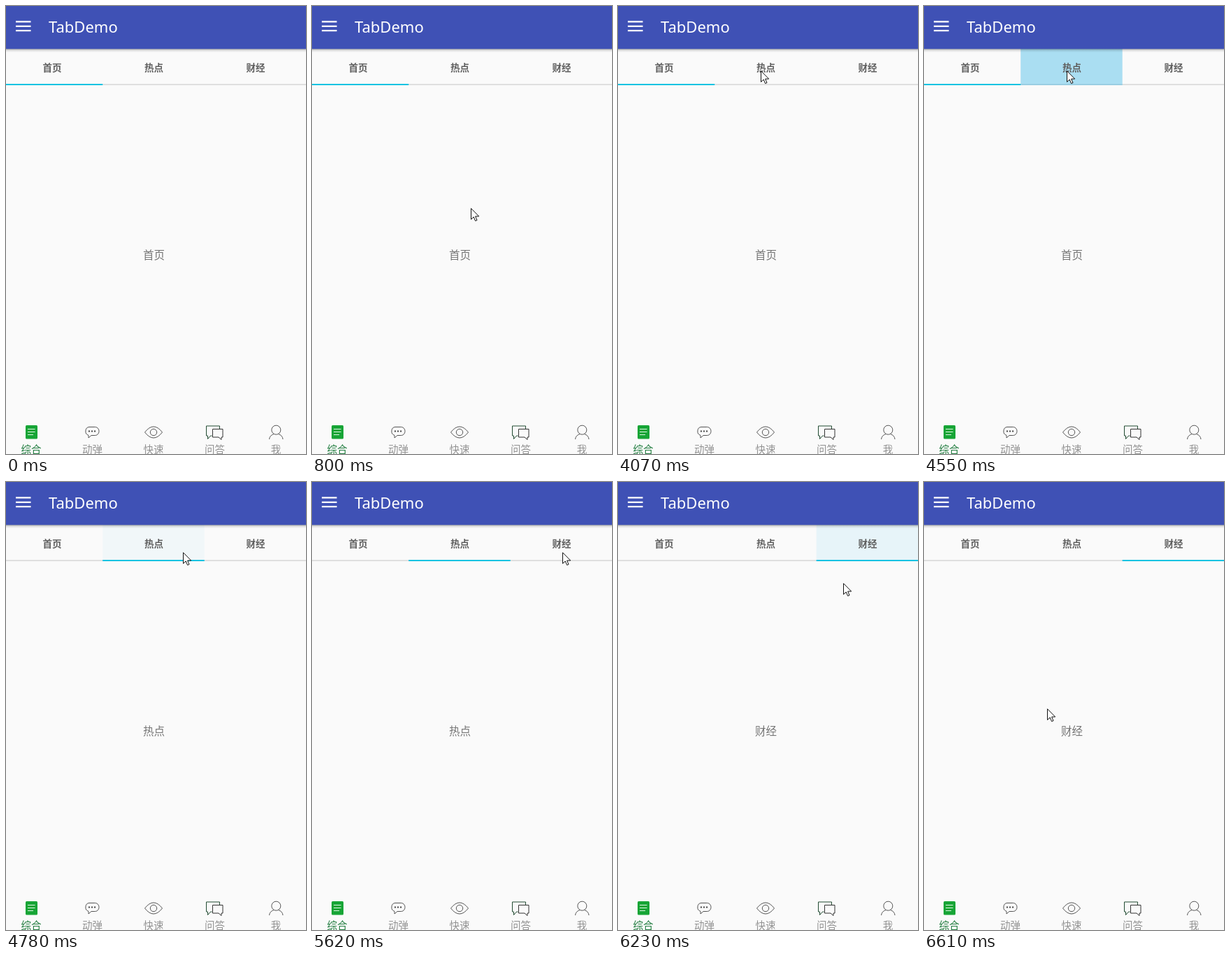
Write an HTML page that moves like this. It is 429 px wide and 639 px high and loops after 8000 ms.

```html
<!DOCTYPE html>
<html lang="zh-CN">
<head>
<meta charset="utf-8">
<title>TabDemo</title>
<style>
  html, body { margin: 0; width: 100%; height: 100%; overflow: hidden; background: #fafafa; }
  svg { display: block; width: 100%; height: 100%; }
  text { font-family: "Noto Sans CJK SC", "Noto Sans CJK", "Noto Sans", sans-serif; text-anchor: middle; }
  .title { font: 22px "Noto Sans", Roboto, sans-serif; text-anchor: start; fill: #fff; }
  .tab { font-size: 13.5px; font-weight: 700; fill: #606060; }
  .page { font-size: 15.5px; fill: #757575; }
  .nav { font-size: 14.5px; fill: #929292; }
  .nav.selected { fill: #1d7a3c; }
  .icons { fill: none; stroke: #555; stroke-linejoin: round; }
</style>
</head>
<body>
<svg viewBox="0 0 429 639" xmlns="http://www.w3.org/2000/svg">
  <defs>
    <linearGradient id="shade" x2="0" y2="1">
      <stop stop-color="#000" stop-opacity=".34"/>
      <stop offset=".4" stop-color="#000" stop-opacity=".1"/>
      <stop offset="1" stop-color="#000" stop-opacity="0"/>
    </linearGradient>
  </defs>
  <rect width="429" height="639" fill="#fafafa"/>

  <g id="pages"></g>

  <rect y="111" width="429" height="2" fill="#dfdfdf"/>
  <rect id="indicator" y="111" width="145.5" height="2" fill="#0bc3e2"/>
  <rect id="press" y="61" width="145.5" height="52" fill="#33b5e5"/>
  <g id="tabs"></g>

  <rect width="429" height="61.3" fill="#3f51b5"/>
  <rect y="61.3" width="429" height="5" fill="url(#shade)"/>
  <path d="M14 22.3h21.500M14 28.800h21.500M14 35.200h21.500" stroke="#fff" stroke-width="2.2"/>
  <text class="title" x="61" y="38">TabDemo</text>

  <g class="icons">
    <rect x="28" y="598" width="17" height="19.5" rx="1.5" fill="#17a536" stroke="none"/>
    <path d="M31 603.5h10.5M31 607.5h10.5M31 611.5h8" stroke="#d9f5de"/>
    <path d="M119 600.5h8.5a5.500 6 0 0 1 0 12h-5.5l-4 3.500v-3.700a5.500 6 0 0 1 1 -11.800z"/>
    <path d="M118 606.5h10" stroke="#333" stroke-width="1.8" stroke-dasharray="1.8 2.3"/>
    <path d="M198.5 608q12.5 -16 25 0q-12.5 16 -25 0z"/>
    <circle cx="211" cy="608" r="4.7"/>
    <path d="M305.5 603v-4h-19v14h2v4.500l4 -4.500h2" stroke="#214a31"/>
    <path d="M295.500 603.500h14.500v11.500h-2v3.500l-4 -3.500h-8.500z" stroke="#333"/>
    <circle cx="386.3" cy="604.7" r="6.5"/>
    <path d="M376.5 618q.5 -5.5 6.5 -7.5M396 618q-.5 -5.5 -6.5 -7.5"/>
  </g>
  <g id="nav"></g>

  <path id="cursor" d="M.5 .7V16.3L4.2 12.9 6.6 18.5 9 17.5 6.6 12H11.7Z" fill="#fff" stroke="#111"/>
</svg>
<script>
const LOOP = 8000, FRAME = 76, STAGE = 429, TAB = 145.5, TAB_LEFT = -7.3;
const SCROLL_MS = 200, INDICATOR_LAG = 11;
const PRESS_LEAD = 20, FADE_DELAY = 30, FADE_MS = 200;

const tabNames = ['首页', '热点', '财经'];
const navNames = ['综合', '动弹', '快速', '问答', '我'];
const clicks = [{ at: 4570, tab: 1 }, { at: 6041.6, tab: 2 }];

const smooth = k => k * k * (3 - 2 * k);
const easeOut = (k, power = 5) => 1 - (1 - k) ** power;
const clamp = v => Math.min(1, Math.max(0, v));

// The pointer rests between moves.
const moves = [
  { start: 570, end: 800, from: [355, 622], to: [227, 288], ease: k => easeOut(k, 2) },
  { start: 2470, end: 2850, from: [211, 250], to: [204, 92], ease: smooth },
  { start: 4550, end: 4778, from: [204, 92], to: [253, 100], ease: smooth },
  { start: 4778, end: 5160, from: [253, 100], to: [358, 100], ease: k => easeOut(k, 2) },
  { start: 6070, end: 6610, from: [358, 100], to: [176, 323], ease: smooth }
];

const $ = id => document.getElementById(id);

function addLabels(id, names, x, y, step, selected) {
  $(id).innerHTML = names.map((name, i) =>
    `<text class="${id.replace(/s$/, '')}${i === selected ? ' selected' : ''}" x="${x + step * i}" y="${y}">${name}</text>`
  ).join('');
}
addLabels('tabs', tabNames, 66, 92.6, TAB);
addLabels('pages', tabNames, 211.5, 360.8, STAGE);
addLabels('nav', navNames, 36, 638, 87.5, 0);

// The screen only refreshes during a move, in whole steps.
function progress({ start, end }, t) {
  const steps = Math.round((end - start) / FRAME);
  return clamp(Math.floor((t - start) / (end - start) * steps + 0.03) / steps);
}

const pagePosition = t =>
  clicks.reduce((sum, { at }) => sum + easeOut(clamp((t - at) / SCROLL_MS)), 0);

function drawPointer(move, k) {
  $('cursor').setAttribute('visibility', move ? 'visible' : 'hidden');
  if (!move) return;
  const { from, to, ease } = move;
  const point = from.map((v, i) => Math.round(v + (to[i] - v) * ease(k)));
  $('cursor').setAttribute('transform', `translate(${point})`);
}

function draw(now) {
  const move = moves.filter(m => m.start <= now).pop();
  const k = move ? progress(move, now) : 0;
  const t = move ? move.start + (move.end - move.start) * k : 0;

  $('pages').setAttribute('transform', `translate(${-STAGE * pagePosition(t)} 0)`);
  $('indicator').setAttribute('x', TAB_LEFT + TAB * pagePosition(t - INDICATOR_LAG));

  const click = clicks.filter(c => c.at - PRESS_LEAD <= t).pop();
  const fade = click ? clamp((t - click.at - FADE_DELAY) / FADE_MS) : 1;
  $('press').setAttribute('x', TAB_LEFT + TAB * (click ? click.tab : 0));
  $('press').setAttribute('opacity', 0.4 * (1 - fade));

  drawPointer(move, k);
}

const began = performance.now();
function tick() {
  draw((performance.now() - began) % LOOP);
  requestAnimationFrame(tick);
}
tick();
</script>
</body>
</html>
```
